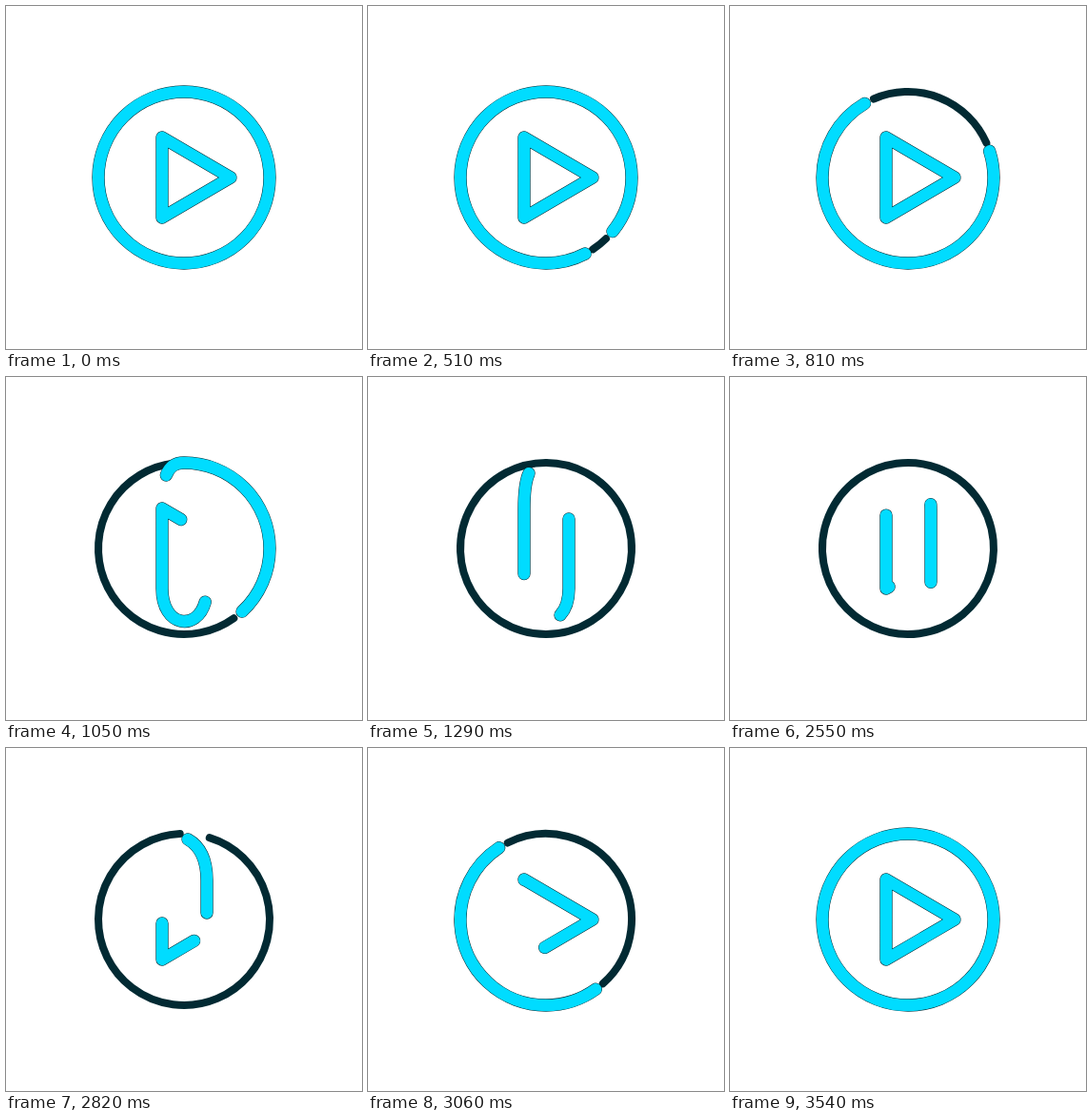
Write an HTML page that moves like this. It is 374 px wide and 360 px high and loops after 4470 ms.

```html
<!DOCTYPE html>
<html>
<head>
<meta charset="utf-8">
<style>
html, body { margin: 0; width: 100%; height: 100%; overflow: hidden; background: #fff; }
svg { display: block; }
path { fill: none; stroke-linecap: round; stroke-linejoin: round; }
.ring { stroke: #022a33; stroke-width: 8; }
.edge { stroke: #022a33; stroke-width: 13.3; }
.line { stroke: #00dcff; stroke-width: 12.3; }
</style>
</head>
<body>
<svg width="374" height="360" viewBox="0 0 374 360">
  <path class="ring"/>
  <path class="edge"/><path class="line"/>
  <path class="edge"/><path class="line"/>
</svg>
<script>
const LOOP = 4470, STEP = 30, SWITCH = 2000;
const CX = 187, CY = 180, R = 90, LAP = 2 * Math.PI * R, BAR = 82;
const ring = document.querySelector('.ring');
const edges = document.querySelectorAll('.edge');
const lines = document.querySelectorAll('.line');

const toTop = 'A90 90 0 0 0 187 90', toBottom = 'A90 90 0 0 0 187 270';
const triangle = 'L236 180 L164 138 V222';

function measure(d) {
  ring.setAttribute('d', d);
  return ring.getTotalLength();
}

// A strand runs along d; tail and head are [time, distance] keys.
function strand(d, keys) {
  const len = measure(d);
  return { d, len, ...keys(len) };
}

const toPause = [
  strand(`M187 270 ${toTop} ${toBottom} ${toTop} C170 90 164 103 164 139 V221`, n => ({
    tail: [[300, 0], [810, 330], [1290, n - BAR - 40], [1530, n - BAR]],
    head: [[300, LAP], [810, 734], [1290, n - 16], [1530, n]]
  })),
  strand(`M164 222 ${triangle} C164 268 211 268 211 222 V139`, n => ({
    tail: [[810, 0], [1290, n - BAR - 31], [1530, n - BAR]],
    head: [[810, 250.7], [1290, n - 10], [1530, n]]
  }))
];

const toPlay = [
  strand(`M211 221 V139 C211 112 200 94 175 90.8 ${toBottom} ${toTop} ${toBottom}`, n => ({
    tail: [[2430, 0], [2820, 48], [3060, 189], [3510, n - LAP]],
    head: [[2430, BAR], [2820, 132], [3060, 475], [3510, n]]
  })),
  strand(`M164 139 V222 ${triangle} L236 180`, () => ({
    tail: [[2430, 0], [2820, 45], [3060, 108], [3510, 128]],
    head: [[2430, BAR], [2820, 122], [3060, 250], [3510, 379]]
  }))
];
const gapKeys = [[2600, 0], [2820, 25], [2980, 0]];

// Smooth monotone curve through the keys, at rest at both ends.
function at(keys, t) {
  const last = keys.length - 1;
  if (t <= keys[0][0]) return keys[0][1];
  if (t >= keys[last][0]) return keys[last][1];
  const rate = i => (keys[i + 1][1] - keys[i][1]) / (keys[i + 1][0] - keys[i][0]);
  const slope = i => {
    if (i === 0 || i === last) return 0;
    const a = rate(i - 1), b = rate(i);
    return a * b > 0 ? 2 * a * b / (a + b) : 0;
  };
  const i = keys.findIndex(k => k[0] > t) - 1;
  const [t0, v0] = keys[i], [t1, v1] = keys[i + 1];
  const w = t1 - t0, u = (t - t0) / w, e = u * u * (3 - 2 * u);
  return v0 + (v1 - v0) * e
    + w * u * (1 - u) * ((1 - u) * slope(i) - u * slope(i + 1));
}

// Counterclockwise arc between two angles in degrees.
function arc(from, to) {
  const span = Math.min(to - from, 359.9);
  if (span <= 0) return '';
  const point = deg => {
    const a = deg * Math.PI / 180;
    return `${CX + R * Math.cos(a)} ${CY - R * Math.sin(a)}`;
  };
  return `M${point(from)} A${R} ${R} 0 ${span > 180 ? 1 : 0} 0 ${point(from + span)}`;
}

function draw(t) {
  const pausing = t < SWITCH;
  const ends = (pausing ? toPause : toPlay).map((s, i) => {
    const tail = at(s.tail, t), head = at(s.head, t);
    for (const el of [edges[i], lines[i]]) {
      el.setAttribute('d', s.d);
      el.setAttribute('stroke-dasharray', `${head - tail} 9999`);
      el.setAttribute('stroke-dashoffset', -tail);
    }
    return [tail, head];
  });

  // The dark ring fills whatever part of the circle the strand leaves free.
  const [a, b] = ends[0].map(s => {
    if (pausing) return 270 + Math.min(s, 1.5 * LAP) / LAP * 360;
    return Math.max(97.7, 630 + (s - toPlay[0].len + LAP) / LAP * 360 - 360);
  });
  const gap = pausing ? 0 : at(gapKeys, t);
  const pad = Math.min(6.5, b - a);
  ring.setAttribute('d', arc(b + pad - gap / 5, a + 360 - pad - gap));
}

let start;
function frame(now) {
  start ??= now;
  const t = (now - start) % LOOP;
  draw(Math.floor(t / STEP) * STEP);
  requestAnimationFrame(frame);
}
draw(0);
requestAnimationFrame(frame);
</script>
</body>
</html>
```
